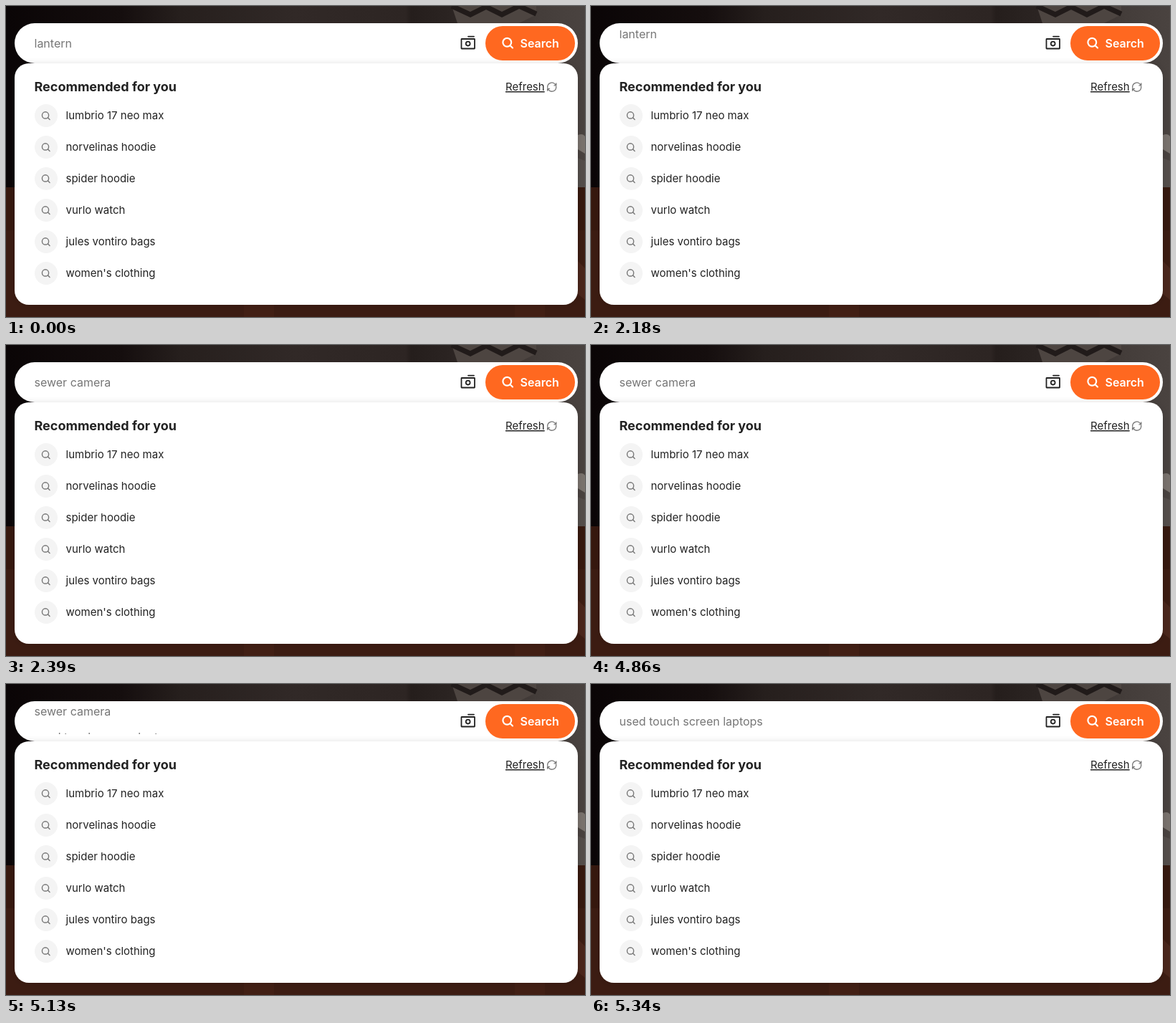
An HTML page for the animation above (5950 ms loop, 808 px wide and 434 px high).

```html
<!DOCTYPE html>
<html lang="en">
<head>
<meta charset="utf-8">
<title>Search suggestions</title>
<style>
  html, body { margin: 0; width: 100%; height: 100%; overflow: hidden; background: #3c1c12; }
  svg { display: block; width: 808px; height: 434px; font: 15px Inter, sans-serif; fill: #222; }
  .line { fill: none; stroke-linecap: round; stroke-linejoin: round; }
  .hint { font-size: 16px; fill: #767676; }
</style>
</head>
<body>
<svg viewBox="0 0 808 434">
  <defs>
    <linearGradient id="photo">
      <stop offset="0" stop-color="#0a0506"/>
      <stop offset=".2" stop-color="#150e0e"/>
      <stop offset=".3" stop-color="#261f1d"/>
      <stop offset=".5" stop-color="#312927"/>
      <stop offset=".69" stop-color="#2d2523"/>
      <stop offset=".7" stop-color="#251e1c"/>
      <stop offset=".77" stop-color="#2b2422"/>
      <stop offset=".92" stop-color="#443d3a"/>
      <stop offset="1" stop-color="#4a4340"/>
    </linearGradient>
    <filter id="shadow" x="-5%" y="-10%" width="110%" height="120%">
      <feDropShadow dx="0" dy="1" stdDeviation="5" flood-opacity=".14"/>
    </filter>
    <clipPath id="window"><rect x="36" y="34" width="580" height="36"/></clipPath>
    <g id="lens" class="line">
      <circle r="4.6"/>
      <path d="M3.4 3.4 6 6"/>
    </g>
  </defs>

  <!-- Backdrop: blurred photo above, brown page below -->
  <rect width="808" height="253" fill="url(#photo)"/>
  <path d="M622 0h118v12l-24 12h-86z" fill="#4d4541"/>
  <path d="M622 0l26 12 22-11 22 11 24-12 24 11" fill="none" stroke="#211b1a" stroke-width="7"/>
  <path d="M798 180q7-3 10 2v24l-10-6z" fill="#79726d"/>
  <path d="M798 212l10 4v37h-10z" fill="#544d4a"/>
  <rect y="253" width="808" height="181" fill="#3c1c12"/>
  <path d="M0 253h12v60H0zM798 253h10v60h-10z" fill="#36180e"/>
  <path d="M332 417h42v17h-42zM710 417h42v17h-42z" fill="#421f14"/>
  <path d="M798 356l10 10v44l-10-8z" fill="#4a261b"/>

  <rect x="12" y="24" width="786" height="56" rx="28" fill="#fff"/>
  <rect x="12" y="80" width="786" height="337" rx="20" fill="#fff" filter="url(#shadow)"/>

  <g clip-path="url(#window)"><g id="hints"></g></g>

  <g class="line" stroke="#222" stroke-width="1.8">
    <rect x="635.5" y="46" width="18.5" height="13.5" rx=".5"/>
    <circle cx="644.7" cy="52.6" r="2.9"/>
    <path d="M645 42.600h8"/>
  </g>

  <rect x="669" y="28" width="125" height="48" rx="24" fill="#ff6820"/>
  <use href="#lens" transform="translate(699.3 50.8) scale(1.28)" stroke="#fff" stroke-width="1.7"/>
  <text x="717.5" y="58" font-size="16" font-weight="600" fill="#fff">Search</text>

  <text x="39.5" y="119" font-size="18" font-weight="700">Recommended for you</text>
  <text x="697" y="118" text-decoration="underline">Refresh</text>
  <g class="line" stroke="#767676" stroke-width="1.3">
    <path d="M755.7 114v-1.500a6 6 0 0 1 10.600-3.300l1.200 1.500M767.800 108v2.900h-2.800"/>
    <path d="M767.700 112.200v1.500a6 6 0 0 1-10.600 3.300l-1.200-1.500M755.600 118.200v-2.900h2.800"/>
  </g>

  <g id="rows"></g>
</svg>

<script>
const LOOP = 5950, PITCH = 36;
const hints = ["lantern", "sewer camera", "used touch screen laptops"];
const rows = ["lumbrio 17 neo max", "norvelinas hoodie", "spider hoodie",
  "vurlo watch", "jules vontiro bags", "women's clothing"];
const scrolls = [[1940, 2390], [4860, 5340]];
const hintGroup = document.getElementById("hints");

hintGroup.innerHTML = hints.map((label, i) =>
  `<text class="hint" x="39.5" y="${58 + i * PITCH}">${label}</text>`).join("");

document.getElementById("rows").innerHTML = rows.map((label, i) =>
  `<g transform="translate(0 ${153 + i * 44})">
    <circle cx="56" r="16" fill="#f4f4f4"/>
    <use href="#lens" x="55" y="-.6" stroke="#767676" stroke-width="1.4"/>
    <text x="83.5" y="5">${label}</text>
  </g>`).join("");

// cubic-bezier(.42, 0, 1, 1), solved for x by bisection
function easeIn(x) {
  let low = 0, high = 1;
  for (let i = 0; i < 20; i++) {
    const u = (low + high) / 2;
    const bx = 1.26 * u * (1 - u) ** 2 + 3 * u * u * (1 - u) + u ** 3;
    if (bx < x) low = u; else high = u;
  }
  return low * low * (3 - 2 * low);
}

function progress(time, [start, end]) {
  return easeIn(Math.min(1, Math.max(0, (time - start) / (end - start))));
}

const origin = performance.now();
function draw() {
  const time = (performance.now() - origin) % LOOP;
  const shift = scrolls.reduce((sum, span) => sum + progress(time, span), 0) * PITCH;
  hintGroup.setAttribute("transform", `translate(0 ${-shift.toFixed(2)})`);
  requestAnimationFrame(draw);
}
draw();
</script>
</body>
</html>
```
